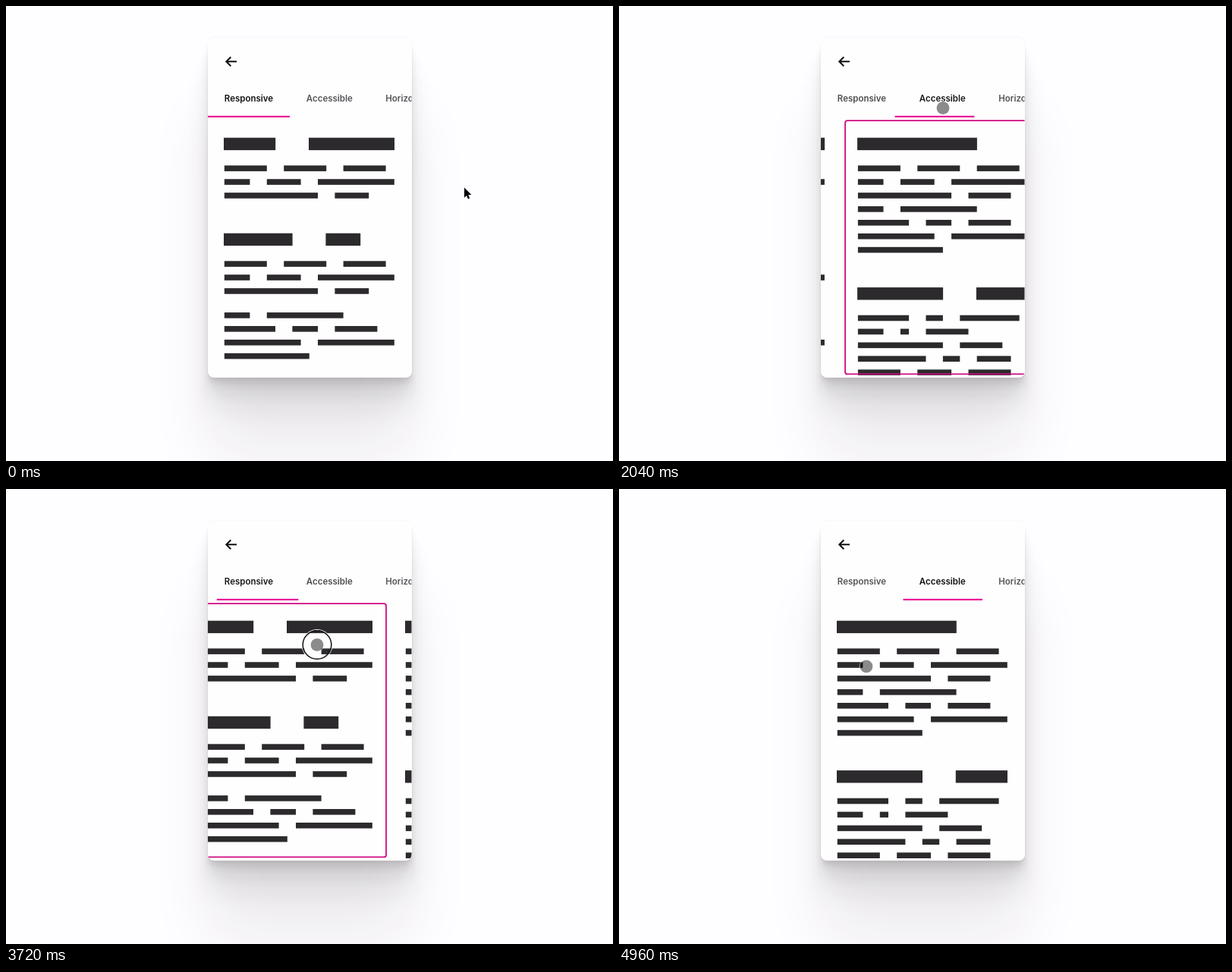
Write an HTML page that moves like this. It is 800x600 px and loops after 5000 ms.

```html
<!DOCTYPE html>
<html lang="en">
<head>
<meta charset="utf-8">
<title>Scroll snap tabs</title>
<style>
html, body { margin: 0; width: 100%; height: 100%; overflow: hidden; background: #fefdff; }
.card {
  position: absolute; left: 266px; top: 42px; width: 269px; height: 448px;
  border-radius: 8px; background: #fffeff;
  --c: 300 10% 12%;
  box-shadow: 0 -1px 2px hsl(var(--c) / .03), 0 3px 2px hsl(var(--c) / .04),
    0 7px 5px hsl(var(--c) / .04), 0 12px 10px hsl(var(--c) / .05),
    0 22px 18px hsl(var(--c) / .06), 0 41px 33px hsl(var(--c) / .07),
    0 100px 80px hsl(var(--c) / .08);
}
svg { position: absolute; left: 0; top: 0; }
text { font: 600 11.5px Inter, Roboto, sans-serif; }
</style>
</head>
<body>
<div class="card"></div>
<svg width="800" height="600" fill="none">
  <clipPath id="clip"><rect x="266" y="42" width="268.5" height="448" rx="8"/></clipPath>
  <path d="M304 73.3H290.5M296.3 67.3L290.3 73.3L296.3 79.3" stroke="#111" stroke-width="2"/>
  <g clip-path="url(#clip)">
    <text class="tab" x="287.8" y="126">Responsive</text>
    <text class="tab" x="395.8" y="126">Accessible</text>
    <text class="tab" x="500.3" y="126">Horizontal</text>
    <rect id="bar" y="144.8" height="2" fill="#e6078d"/>
    <g id="pages"></g>
  </g>
  <path id="arrow" d="M0 0V13.2L3 10.4L5 15L7.2 14L5.2 9.6H9.4Z" fill="#000" stroke="#fff" stroke-width="1" paint-order="stroke"/>
  <g id="touch">
    <circle r="8.5" fill="#000" fill-opacity=".45"/>
    <circle r="9" stroke="#fff" stroke-opacity=".5"/>
    <g id="press">
      <circle r="20" stroke="#fff"/>
      <circle r="18.8" stroke="#111" stroke-width="1.5"/>
    </g>
  </g>
</svg>
<script>
const LOOP = 5000, FRAME = 40, PAGE = 268;
const $ = id => document.getElementById(id);

// Blocks: [top, heading word lengths, line word lengths]
const pages = [
  [[174, '3 5', '5 5 5/3 4 9/11 4'],
   [300, '4 2', '5 5 5/3 4 9/11 4'],
   [367.8, '', '3 9/6 3 5/9 9/10']],
  [[174, '7', '5 5 5/3 4 9/11 5/3 9/6 3 5/9 9/10'],
   [371.4, '5 3', '6 2 7/3 1 5/10 5/8 2 4/5 4 5']]
];

const rect = (x, y, w, h) => `<rect x="${x}" y="${y}" width="${w}" height="${h}" fill="#2c2a2d"/>`;

function words(line, x, y, unit, h, extra) {
  if (!line) return '';
  return line.split(' ').map(n => {
    const r = rect(x, y, n * unit + extra, h);
    x += (+n + 2) * unit;
    return r;
  }).join('');
}

$('pages').innerHTML = pages.map((blocks, i) =>
  `<g transform="translate(${i * PAGE})">` +
  blocks.map(([y, head, lines]) =>
    words(head, 287, y - .3, 22.4, 16.4, 1) +
    lines.split('/').map((l, k) => words(l, 287.8, y + 36.3 + k * 17.92, 11.2, 7.6, 0)).join('')
  ).join('') +
  '<rect class="ring" x="271" y="151.2" width="259" height="334.2" rx="3" stroke="#cf0a80" stroke-width="1.8"/></g>'
).join('');

const rings = document.querySelectorAll('.ring');
const tabs = document.querySelectorAll('.tab');

// Pointer path: [time, x, y]
const path = [
  [0, 604, 239.5], [720, 604, 239.5], [800, 609, 242], [1200, 451, 180.5], [1240, 447, 175],
  [1640, 427, 119], [1840, 427, 119], [2040, 427, 134.5], [2160, 415, 138], [2560, 321, 119],
  [2840, 320, 119], [3040, 326.5, 156.5], [3200, 350, 188], [3580, 440, 207], [3640, 439, 206],
  [3720, 410, 205.5], [4200, 285, 205], [4320, 275, 205], [4380, 266, 206], [4480, 275, 212],
  [4760, 330, 232], [4920, 330, 232], [4960, 326, 234]
];

const slope = (i, a) => {
  const p = path[i], q = path[i + 1];
  return p && q ? (q[a] - p[a]) / (q[0] - p[0]) : 0;
};
// Harmonic mean keeps the curve free of overshoot
const tangent = (i, a) => {
  const m = slope(i - 1, a), n = slope(i, a);
  return m * n > 0 ? 2 * m * n / (m + n) : 0;
};

function pointer(t, a) {
  let i = path.findIndex(k => k[0] > t) - 1;
  if (i < 0) return path[path.length - 1][a];
  const p = path[i], q = path[i + 1], d = q[0] - p[0], u = (t - p[0]) / d, v = 1 - u;
  return p[a] * v * v * (1 + 2 * u) + q[a] * u * u * (3 - 2 * u) +
    d * u * v * (tangent(i, a) * v - tangent(i + 1, a) * u);
}

const clamp = u => Math.min(1, Math.max(0, u));
const ease = u => (u = clamp(u), u * u * (3 - 2 * u));

function scroll(t) {
  if (t < 2600) return PAGE * ease((t - 1775) / 330);
  if (t < 3640) return PAGE * (1 - ease((t - 2775) / 330));
  const drag = 439 - pointer(Math.min(t, 4200), 1);
  return drag + (PAGE - drag) * (1 - (1 - clamp((t - 4200) / 500)) ** 2.34);
}

const within = (t, a, b) => t >= a && t < b;
const show = (el, on) => el.style.display = on ? '' : 'none';

function draw(t) {
  const off = scroll(t), p = off / PAGE;
  $('pages').setAttribute('transform', `translate(${-off})`);
  $('bar').setAttribute('x', 266 + 108.5 * p);
  $('bar').setAttribute('width', 108 - 3.5 * p);
  [1 - p, p, 0].forEach((on, i) => {
    const c = 86 - 66 * on;
    tabs[i].setAttribute('fill', `rgb(${c},${c - 2},${c + 1})`);
  });
  show(rings[0], t >= 2720);
  show(rings[1], within(t, 1720, 2720));

  const x = pointer(t, 1), y = pointer(t, 2), inside = x < 535;
  const at = `translate(${x} ${y})`;
  $('arrow').setAttribute('transform', at);
  $('touch').setAttribute('transform', at);
  show($('arrow'), !inside);
  show($('touch'), inside);
  show($('press'), within(t, 1700, 1860) || within(t, 2700, 2860) || within(t, 3620, 4200));
}

const start = performance.now();
function tick() {
  const t = (performance.now() - start) % LOOP;
  draw(Math.floor(t / FRAME) * FRAME);
  requestAnimationFrame(tick);
}
tick();
</script>
</body>
</html>
```
